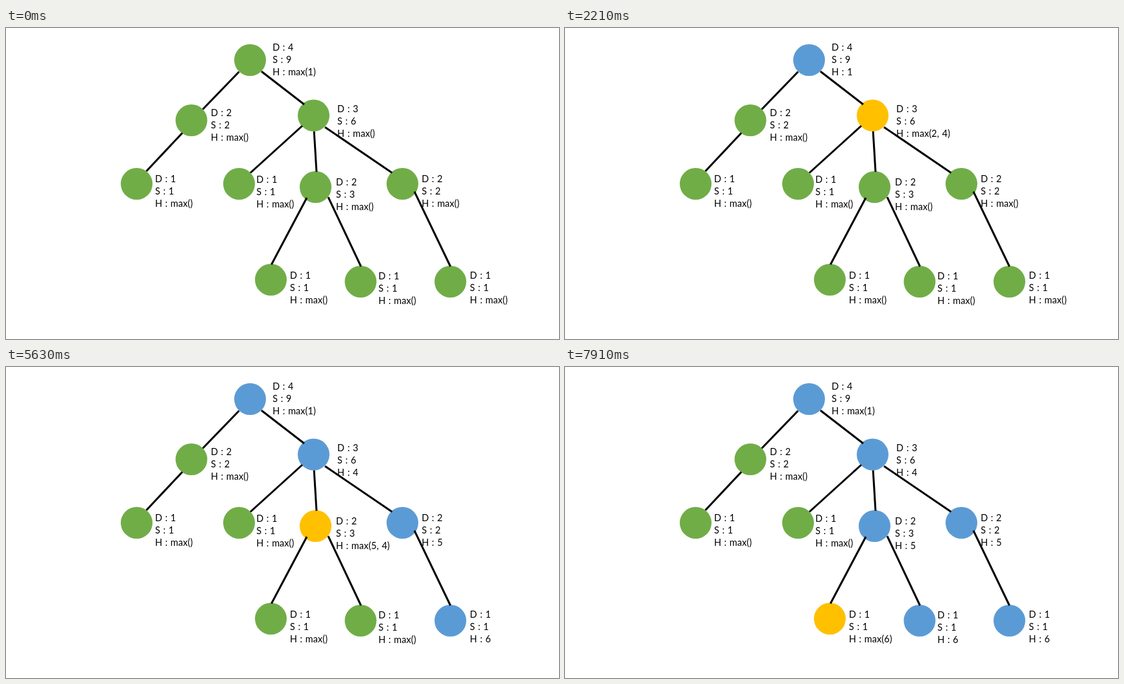
Recreate the animation shown at these times as an HTML page. Size 853 by 480 pixels, loop 8000 ms.

```html
<!DOCTYPE html>
<html lang="en">
<head>
<meta charset="utf-8">
<title>Tree traversal</title>
<style>
  html, body { margin: 0; width: 100%; height: 100%; overflow: hidden; background: #fff; }
  svg { display: block; width: 853px; height: 480px; }
  line { stroke: #000; stroke-width: 3; }
  text { font: 14.4px Lato, "Open Sans", sans-serif; letter-spacing: .1px; word-spacing: .8px; fill: #000; }
</style>
</head>
<body>
<svg id="stage" viewBox="0 0 853 480"></svg>
<script>
const LOOP = 8000, RADIUS = 24.5, ROW = 19;
const WAITING = '#70ad47', ACTIVE = '#ffc000', DONE = '#5b9bd5';

// centre x, centre y, label x, first baseline, depth, size
const nodes = {
  root:      [376.5, 49.5, 411.2, 35, 4, 9],
  left:      [286, 142.5, 315.9, 136, 2, 2],
  leftLeaf:  [201.5, 240.5, 229.9, 238, 1, 1],
  right:     [474.5, 135, 511, 130, 3, 6],
  first:     [359.5, 240.5, 386.2, 239, 1, 1],
  middle:    [477.5, 245.5, 508.9, 243, 2, 3],
  last:      [611.5, 240.5, 641.2, 238, 2, 2],
  leafA:     [408.5, 388.5, 437.9, 387, 1, 1],
  leafB:     [547, 391.5, 574.4, 388, 1, 1],
  leafC:     [685.5, 391.5, 715.6, 387, 1, 1]
};

const edges = [
  [359.5, 67.5, 303.5, 125.5], [394, 67, 460, 118],
  [272, 162, 216.5, 221], [457, 151, 377, 223.5],
  [475.2, 159.5, 479, 222], [492, 153, 595.5, 223.5],
  [464, 262, 409.5, 365], [497, 261, 547.5, 368],
  [630, 252.5, 685.5, 368]
];

// start time, then node: [colour, height]
const steps = [
  [0, { root: [WAITING, 'max(1)'] }],
  [1070, { root: [ACTIVE, 'max(1)'] }],
  [2210, { root: [DONE, '1'], right: [ACTIVE, 'max(2, 4)'] }],
  [3350, { root: [DONE, 'max(1)'], right: [DONE, '4'], last: [ACTIVE, 'max(5, 4)'] }],
  [4490, { last: [DONE, '5'], leafC: [ACTIVE, 'max(6)'] }],
  [5630, { leafC: [DONE, '6'], middle: [ACTIVE, 'max(5, 4)'] }],
  [6770, { middle: [DONE, '5'], leafB: [ACTIVE, 'max(6)'] }],
  [7910, { leafB: [DONE, '6'], leafA: [ACTIVE, 'max(6)'] }]
];

const stage = document.getElementById('stage');
const list = Object.entries(nodes);
const row = (x, y, text, id = '') => `<text x="${x}" y="${y}" ${id}>${text}</text>`;

stage.innerHTML =
  list.map(([name, [cx, cy]]) =>
    `<circle id="${name}" cx="${cx}" cy="${cy}" r="${RADIUS}"/>`).join('') +
  edges.map(([x1, y1, x2, y2]) =>
    `<line x1="${x1}" y1="${y1}" x2="${x2}" y2="${y2}"/>`).join('') +
  list.map(([name, [, , x, y, depth, size]]) =>
    row(x, y, `D : ${depth}`) +
    row(x, y + ROW, `S : ${size}`) +
    row(x, y + 2 * ROW, '', `id="${name}-height"`)).join('');

const parts = list.map(([name]) => ({
  name,
  circle: document.getElementById(name),
  height: document.getElementById(name + '-height')
}));

let shown = -1;

function draw(time) {
  const count = steps.filter(([start]) => start <= time).length;
  if (count === shown) return;
  shown = count;
  const state = Object.assign({}, ...steps.slice(0, count).map(([, change]) => change));
  for (const { name, circle, height } of parts) {
    const [colour, value] = state[name] || [WAITING, 'max()'];
    circle.setAttribute('fill', colour);
    height.textContent = `H : ${value}`;
  }
}

function tick() {
  draw(performance.now() % LOOP);
  requestAnimationFrame(tick);
}
tick();
</script>
</body>
</html>
```
